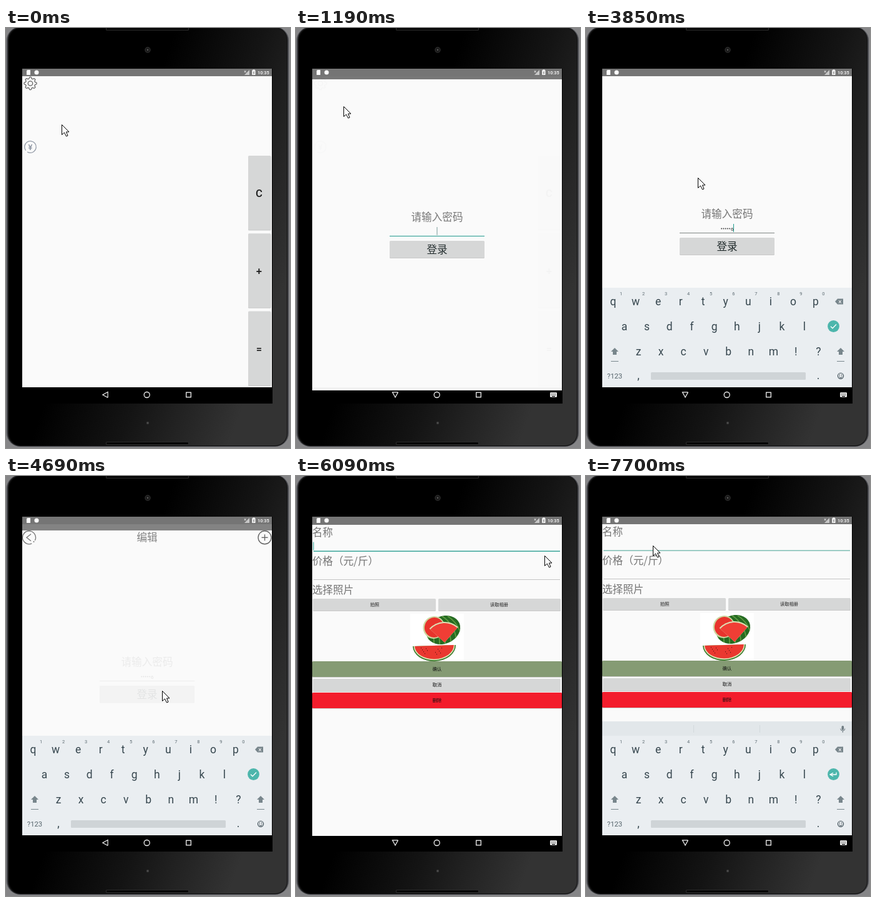
Recreate the animation shown at these times as an HTML page with a canvas. Size 455 px wide and 671 px high, loop 8000 ms.

```html
<!DOCTYPE html>
<html lang="zh-CN">
<head>
<meta charset="utf-8">
<title>Tablet demo</title>
<style>
html, body { margin: 0; width: 100%; height: 100%; overflow: hidden; background: #888; }
canvas { display: block; }
</style>
</head>
<body>
<canvas id="stage" width="455" height="671"></canvas>
<script>
const LOOP = 8000, STEP = 70;
const ROBOTO = 'Roboto, sans-serif';
const CJK = '"Noto Sans CJK SC", "Noto Sans CJK", sans-serif';
const GREY = '#757575', TEAL = '#1b978a', INK = '#37474f', KEY = '#78868c';
const LEFT = 26, TOP = 65, BAR = 12, WIDE = 400, NAV = 574, END = 600;

const makeLayer = () => Object.assign(document.createElement('canvas'), { width: 455, height: 671 });
const screenCtx = document.getElementById('stage').getContext('2d');
const layer = makeLayer(), layerCtx = layer.getContext('2d');
const shell = makeLayer();
let g = screenCtx;

const clamp = v => Math.max(0, Math.min(1, v));

function rect(x, y, w, h, color) { g.fillStyle = color; g.fillRect(x, y, w, h); }

function box(x, y, w, h, r, color) {
  g.fillStyle = color;
  g.beginPath(); g.roundRect(x, y, w, h, r); g.fill();
}

function oval(x, y, rx, ry, tilt, color, to = Math.PI * 2) {
  g.fillStyle = color;
  g.beginPath(); g.ellipse(x, y, rx, ry, tilt, 0, to); g.fill();
}

const disc = (x, y, r, color) => oval(x, y, r, r, 0, color);

function ring(x, y, r, color, width, from = 0, to = Math.PI * 2) {
  g.strokeStyle = color; g.lineWidth = width;
  g.beginPath(); g.arc(x, y, r, from, to); g.stroke();
}

function trace(pts) {
  g.beginPath();
  for (let i = 0; i < pts.length; i += 2) g.lineTo(pts[i], pts[i + 1]);
}

function line(color, width, ...pts) {
  g.strokeStyle = color; g.lineWidth = width;
  trace(pts); g.stroke();
}

function poly(color, ...pts) { g.fillStyle = color; trace(pts); g.closePath(); g.fill(); }

// Triangle or chevron pointing along angle a
function tip(x, y, r, a) {
  return [-1, 0, 1].flatMap(k => [
    x + r * (k ? -0.5 : 0.5) * Math.cos(a) - r * 0.55 * k * Math.sin(a),
    y + r * (k ? -0.5 : 0.5) * Math.sin(a) + r * 0.55 * k * Math.cos(a)
  ]);
}

function plus(x, y, r, color, width) {
  line(color, width, x - r, y, x + r, y);
  line(color, width, x, y - r, x, y + r);
}

function text(s, x, y, size, color, family = ROBOTO, align = 'center', weight = 400) {
  g.font = `${weight} ${size}px ${family}`;
  g.textAlign = align; g.textBaseline = 'alphabetic';
  g.fillStyle = color;
  g.fillText(s, x, y);
}

// Chinese label centred vertically on cy
function label(s, x, cy, size, color, align = 'center') {
  text(s, x, cy + size * 0.37, size, color, CJK, align);
}

function button(x, y, w, h, color = '#d6d7d7') {
  box(x, y + 1, w, h, 1.5, 'rgba(0,0,0,.2)');
  box(x, y, w, h, 1.5, color);
}

// Paints on the spare layer, then blends it as one sheet.
function sheet(dy, alpha, paint) {
  layerCtx.clearRect(0, 0, 455, 671);
  layerCtx.save();
  layerCtx.translate(0, dy);
  g = layerCtx;
  paint();
  layerCtx.restore();
  g = screenCtx;
  g.globalAlpha = alpha;
  g.drawImage(layer, 0, 0);
  g.globalAlpha = 1;
}

function paintShell() {
  g = shell.getContext('2d');
  rect(0, 0, 455, 671, '#858587');
  box(1, -2, 452, 671, 22, '#48494e');
  box(3, -1, 448, 669, 20, '#111');
  const sheen = g.createLinearGradient(170, 290, 455, 390);
  sheen.addColorStop(0, '#000');
  sheen.addColorStop(0.45, '#141414');
  sheen.addColorStop(0.8, '#282828');
  sheen.addColorStop(1, '#333');
  box(5, 0, 445, 667, 19, sheen);
  for (const y of [-1, 661]) {
    box(160, y, 133, 5, 1.5, '#2b2b2b');
    box(161, y + 1, 131, 3, 1, '#050505');
  }
  disc(227, 35, 4.7, '#2c2c2c');
  disc(227, 35, 3.2, '#151515');
  disc(227, 35, 1.4, '#555');
  disc(227, 631, 2.2, '#3a3a3a');
  disc(227, 631, 1, '#555');
  rect(LEFT, TOP, WIDE + 1, END - TOP, '#000');
  g = screenCtx;
}

function gear(x, y) {
  g.strokeStyle = '#666'; g.lineWidth = 1.3;
  g.beginPath();
  for (let i = 0; i <= 96; i++) {
    const a = i / 96 * Math.PI * 2;
    const r = 8.9 + 1.2 * Math.tanh(2.5 * Math.cos(8 * a));
    g.lineTo(x + r * Math.cos(a), y + r * Math.sin(a));
  }
  g.stroke();
  ring(x, y, 3.7, '#666', 1.3);
}

function home() {
  gear(39, 88.5);
  ring(39, 190, 9.3, '#929aa6', 1.3, 2.5, 8.4);
  text('¥', 39, 194.7, 13, '#8a92a0', ROBOTO, 'center', 500);
  ['C', '+', '='].forEach((s, i) => {
    const y = 204 + i * 124.3;
    button(388, y, 36.5, 118.5);
    text(s, 405.5, y + 66, 16.6, '#1d1d1d', ROBOTO, 'center', 500);
  });
}

function login(t) {
  label('请输入密码', 226, 297, 16.6, GREY);
  rect(150, 327, 152, 1, t < 1260 ? TEAL : '#7f8583');

  const typed = Math.max(0, Math.min(6, Math.floor((t - 2170) / 336) + 1));
  const width = typed ? typed * 3.25 + 1.3 : 0;
  const left = 226 - width / 2;
  for (let i = 0; i < typed - 1; i++) disc(left + 1.6 + i * 3.25, 320.5, 1, '#444');
  if (typed) text(typed, left + width, 323.5, 8, '#333', ROBOTO, 'right');
  if (t < 1540 || (t >= 2030 && t < 4340)) {
    rect(typed ? Math.round(left + width) : 225.5, 313, 1, 13, typed ? TEAL : '#779a96');
  }

  button(150, 335, 152, 27);
  const press = clamp((t - 4410) / 250);
  if (press > 0) {
    g.save();
    g.beginPath(); g.rect(150, 335, 152, 27); g.clip();
    disc(250, 346, 15 + 90 * press, 'rgba(0,0,0,.1)');
    g.restore();
  }
  label('登录', 226, 348.5, 16.6, '#202a2b');
}

function edit() {
  ring(37, 88.3, 10.5, '#666', 1.3, 1.15, 6.75);
  line('#666', 1.3, ...tip(36.5, 88.3, 10, Math.PI).map((v, i) => i % 2 ? v : 36.5 + (v - 36.5) * 0.7));
  disc(44.5, 95, 1, '#666');
  label('编辑', 226, 88, 16.6, GREY);
  ring(414.5, 88.3, 10.5, '#555', 1.4);
  plus(414.5, 88.3, 5, '#555', 1.4);
}

function melon() {
  rect(183, 219, 86, 76, '#fff');
  g.save();
  oval(236, 245, 28, 22, -0.4, '#256b22');
  g.clip();
  for (let x = 212; x < 268; x += 9) ring(x - 50, 265, 50, '#5f9c42', 1.8, -1, 1);
  g.restore();

  oval(221, 241, 17.5, 18, 0.3, '#cdd6a0');
  oval(221.5, 241, 15.5, 16, 0.3, '#e8332c');
  for (const [r, color] of [[33, '#dfe0b4'], [31, '#f03e35']]) {
    g.fillStyle = color;
    g.beginPath(); g.moveTo(238, 265); g.arc(238, 265, r, -2.4, -0.85); g.fill();
  }

  ['#397a2b', '#dfe5b8', '#ea3830'].forEach((color, i) =>
    oval(221.5, 270, 34.5 - i * 1.6, 25 - i * 1.8, -0.03, color, Math.PI));
  for (let i = 0; i < 12; i++) rect(200 + (i * 23) % 44, 273 + (i * 7) % 11, 1, 1.5, '#6a1915');
}

function form(t) {
  ['名称', '价格（元/斤）', '选择照片'].forEach((s, i) =>
    label(s, LEFT, 88.5 + i * 46.2, 16.6, GREY, 'left'));
  rect(28, 118.5, 395, 1.3, t < 6400 ? TEAL : '#6db5aa');
  rect(28, 164, 395, 1, '#c4c4c4');
  if (t < 6790 || (t >= 7280 && t < 7700)) rect(27.5, 104.5, 1, 13, TEAL);
  button(27, 195, 197, 19);
  button(228, 195, 196, 19);
  label('拍照', 126, 204.5, 7.3, '#222');
  label('读取相册', 325.5, 204.5, 7.3, '#222');
  melon();
  button(LEFT, 295, WIDE, 25, '#859b74');
  button(27, 323, 397, 20);
  button(LEFT, 345, WIDE, 25, '#f31c2c');
  ['确认', '取消', '删除'].forEach((s, i) => label(s, 226, 307.7 + i * 25, 7.3, '#111'));
}

function page(draw, t) {
  rect(LEFT, TOP, WIDE, BAR, GREY);
  rect(LEFT, TOP + BAR, WIDE, NAV - TOP - BAR, '#fafafa');
  rect(LEFT, NAV, WIDE, 45, '#000');
  draw(t);
}

function shift(x) {
  poly(KEY, x, 511, x + 6, 517, x - 6, 517);
  rect(x - 3, 517, 6, 5, KEY);
  rect(x - 6, 532, 12, 1, KEY);
}

function keyboard(withStrip) {
  rect(LEFT, 415, WIDE, NAV - 415, '#eaeef1');
  if (withStrip) {
    rect(LEFT, 392, WIDE, 23, '#e2e7ea');
    for (const x of [172, 278]) rect(x, 398, 1, 12, '#d3d9dc');
    box(409.5, 399, 3.6, 7, 1.8, '#6f7c82');
    ring(411.3, 403.5, 3.6, '#6f7c82', 1, 0, Math.PI);
    rect(410.8, 407, 1, 3, '#6f7c82');
  }
  const keys = (row, x, y, size = 17.5, color = INK) =>
    [...row].forEach((k, i) => text(k, x + i * 36.05, y, size, color));
  keys('qwertyuiop', 43.5, 443);
  keys('asdfghjkl', 61.5, 483);
  keys('zxcvbnm!?', 84, 522.5);
  keys('1234567890', 56, 427, 7.5, '#5d6b72');

  poly(KEY, 399, 437, 403, 432.5, 403, 441.5);
  rect(403, 432.5, 9, 9, KEY);
  text('×', 406.8, 440.5, 10, '#fff');

  disc(396.5, 476.5, 9.4, '#4db6ac');
  if (withStrip) {
    line('#fff', 1.3, 401, 473.5, 401, 477, 392, 477);
    line('#fff', 1.3, ...tip(393.5, 477, 5, Math.PI));
  } else {
    line('#fff', 1.3, 392, 476.8, 395, 479.8, 401, 473.5);
  }
  shift(46);
  shift(408);
  text('?123', 46, 560, 11.3, '#56656c');
  text(',', 84, 561, 17.5, INK);
  text('.', 372, 561, 17.5, INK);
  box(104, 550, 248, 12, 1.5, '#cfd4d7');
  ring(408, 555.8, 4.6, INK, 1.1);
  for (const x of [406.3, 409.7]) disc(x, 554.4, 0.8, INK);
  ring(408, 556, 2.5, INK, 1, 0.2, 2.94);
}

function statusIcons() {
  const w = '#fff';
  box(33, 67, 6, 8, [2, 0.5, 0.5, 0.5], w);
  disc(49, 71, 3.5, w);
  poly('#c8c8c8', 390, 67, 390, 75, 382, 75);
  text('×', 383, 72, 7, w);
  rect(395.5, 66.5, 3, 1, w);
  box(394.3, 67.3, 5.2, 7.7, 0.6, w);
  line(GREY, 1, 397.5, 69, 396.3, 71.5, 397.6, 71.5, 396.5, 74);
  text('10:35', 412.3, 74, 7.3, w, ROBOTO, 'center', 500);
}

function navIcons(typing) {
  const w = '#f2f2f2';
  const arrow = tip(159, 586, 8.2, typing ? Math.PI / 2 : Math.PI);
  line(w, 1.2, ...arrow, arrow[0], arrow[1]);
  ring(225.7, 586, 4.5, w, 1.3);
  g.strokeRect(288.7, 582.2, 7.6, 7.6);
  if (!typing) return;
  box(407, 582.3, 11, 7.5, 1, w);
  for (let i = 0; i < 8; i++) rect(408.5 + (i % 4) * 2.2, 584 + (i >> 2) * 2, 1, 1, '#000');
  rect(410, 588, 5, 1, '#000');
}

// Pointer moves: from time, to time, end point
const moves = [
  [350, 910, 38, 87], [1050, 1190, 76, 125], [1190, 1540, 193, 305],
  [1610, 1820, 179, 239], [3920, 4550, 250, 343], [5110, 5390, 419, 69],
  [5390, 5810, 419, 86], [5950, 6090, 398, 127], [6160, 6930, 107, 111]
];

function pointer(t) {
  let x = t < STEP ? 89 : 88, y = t < STEP ? 154 : 152;
  for (const [from, to, toX, toY] of moves) {
    const p = clamp((t - from) / (to - from));
    x += (toX - x) * p;
    y += (toY - y) * p;
  }
  g.save();
  g.translate(Math.round(x) + 0.5, Math.round(y) + 0.5);
  const arrow = [0, 0, 0, 16, 4, 12.5, 7, 18.5, 9.5, 17.5, 7, 11.5, 11.5, 11.5, 0, 0];
  poly('#fff', ...arrow);
  line('#000', 1, ...arrow);
  g.restore();
}

// begin: start of the eased entrance; show: first moment on screen
const scenes = [
  { draw: home, begin: -LOOP, show: 0 },
  { draw: login, begin: 1070, show: 1120 },
  { draw: edit, begin: 4604, show: 4620 },
  { draw: form, begin: 5920, show: 6020 }
];

function render(t) {
  g = screenCtx;
  g.drawImage(shell, 0, 0);
  g.save();
  g.beginPath(); g.rect(LEFT, TOP, WIDE, END - TOP); g.clip();

  const n = scenes.filter(s => t >= s.show).length - 1;
  const age = t - scenes[n].begin;
  const slide = 41 * (1 - clamp(age / 350)) ** 5;
  const fade = 1 - (1 - clamp(age / 200)) ** 4;
  if (fade < 1) page(scenes[n - 1].draw, t);
  sheet(Math.round(slide), fade, () => page(scenes[n].draw, t));

  const second = t > 6000;
  const rise = second ? clamp((t - 6230) / 210) : clamp((t - 1260) / 210) * clamp((4900 - t) / 190);
  if (rise > 0) {
    const ease = 1 - (1 - rise) ** 2;
    sheet((1 - ease) * 18, ease, () => keyboard(second));
    rect(LEFT, NAV, WIDE, END - NAV, '#000');
  }
  statusIcons();
  navIcons(n % 2 === 1);
  g.restore();
  pointer(t);
}

paintShell();
const start = performance.now();
function tick() {
  const t = (performance.now() - start) % LOOP;
  render(Math.floor(t / STEP) * STEP);
  requestAnimationFrame(tick);
}
tick();
</script>
</body>
</html>
```
